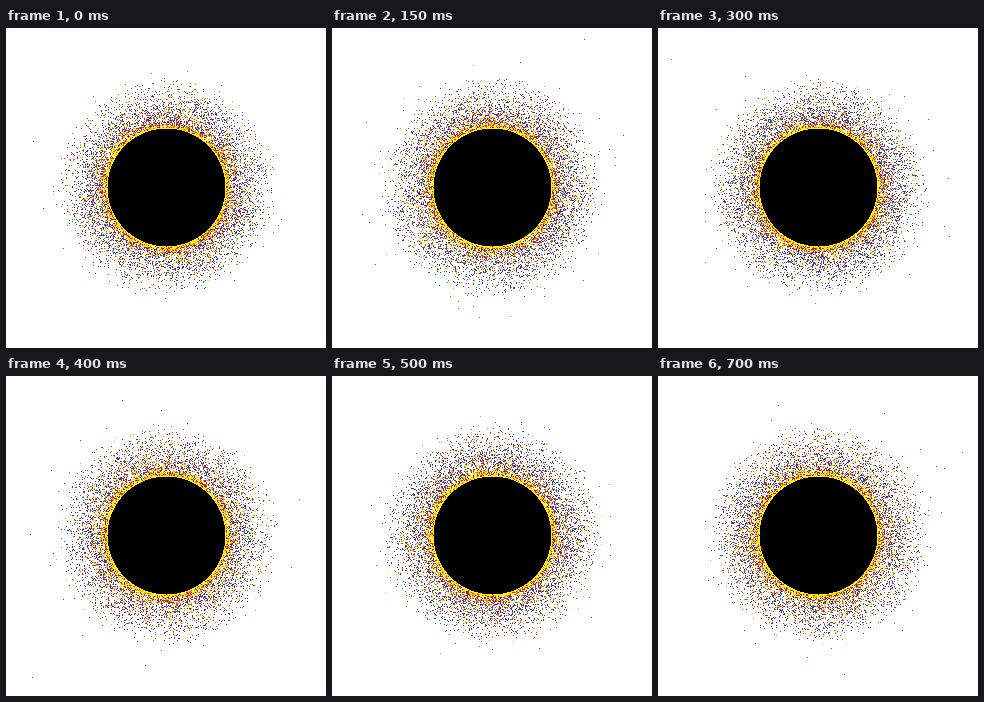
Recreate the animation shown at these times as an HTML page without scripts. Size 320x320 px, loop 0.75 s.

```html
<!DOCTYPE html>
<html lang="en">
<head>
<meta charset="utf-8">
<title>Speckled halo</title>
<style>
  html, body { margin: 0; width: 100%; height: 100%; overflow: hidden; background: #fff; }
  svg { display: block; width: 320px; height: 320px; }
</style>
</head>
<body>
<svg viewBox="0 0 320 320">
  <defs>
    <!-- Red sets how dense the specks are, green shifts their colour towards yellow -->
    <radialGradient id="falloff" gradientUnits="userSpaceOnUse" cx="160.5" cy="159.5" r="143">
      <stop offset=".42" stop-color="rgb(73%, 95%, 0%)"/>
      <stop offset=".44" stop-color="rgb(58%, 80%, 0%)"/>
      <stop offset=".476" stop-color="rgb(50%, 67%, 0%)"/>
      <stop offset=".53" stop-color="rgb(46%, 59%, 0%)"/>
      <stop offset=".615" stop-color="rgb(40%, 54%, 0%)"/>
      <stop offset=".7" stop-color="rgb(33%, 50%, 0%)"/>
      <stop offset=".74" stop-color="rgb(27%, 48%, 0%)"/>
      <stop offset=".77" stop-color="rgb(21%, 47%, 0%)"/>
      <stop offset=".805" stop-color="rgb(15%, 46%, 0%)"/>
      <stop offset=".84" stop-color="rgb(12%, 46%, 0%)"/>
      <stop offset="1" stop-color="rgb(8%, 46%, 0%)"/>
      <stop offset="1" stop-color="rgb(0%, 46%, 0%)"/>
    </radialGradient>

    <filter id="specks" filterUnits="userSpaceOnUse" x="0" y="0" width="320" height="320"
            color-interpolation-filters="sRGB">
      <feTurbulence type="fractalNoise" baseFrequency="1.618" numOctaves="3" seed="1">
        <animate attributeName="seed" values="1;2;3;4;5;6;7;8;9;10;11;12;13;14;15"
                 dur="750ms" calcMode="discrete" repeatCount="indefinite"/>
      </feTurbulence>
      <feColorMatrix values=".75 0 .75 0 -.25
                             0 1.75 0 0 -.375
                             0 0 0 0 0
                             0 0 0 0 1" result="noise"/>
      <feComposite in="noise" in2="SourceGraphic" operator="arithmetic" k2="1" k3="1" k4="-.5"/>
      <!-- Cut density to on or off and spread the hue index over all channels -->
      <feColorMatrix values="0 1 0 0 0
                             0 1 0 0 0
                             0 1 0 0 0
                             255 0 0 0 -127"/>
      <!-- green, brown, green, blue, blue, orange, red, yellow -->
      <feComponentTransfer>
        <feFuncR type="discrete" tableValues=".13 .8 .13 .2 .2 1 .87 1"/>
        <feFuncG type="discrete" tableValues=".53 .4 .53 .2 .2 .6 .1 .93"/>
        <feFuncB type="discrete" tableValues=".33 0 .33 .8 .8 0 .1 0"/>
      </feComponentTransfer>
    </filter>
  </defs>

  <rect width="320" height="320" fill="url(#falloff)" filter="url(#specks)"/>
  <g shape-rendering="crispEdges">
    <circle cx="160.5" cy="159.5" r="60" fill="#ffee00"/>
    <circle cx="160.5" cy="159.5" r="59"/>
  </g>
</svg>
</body>
</html>
```
